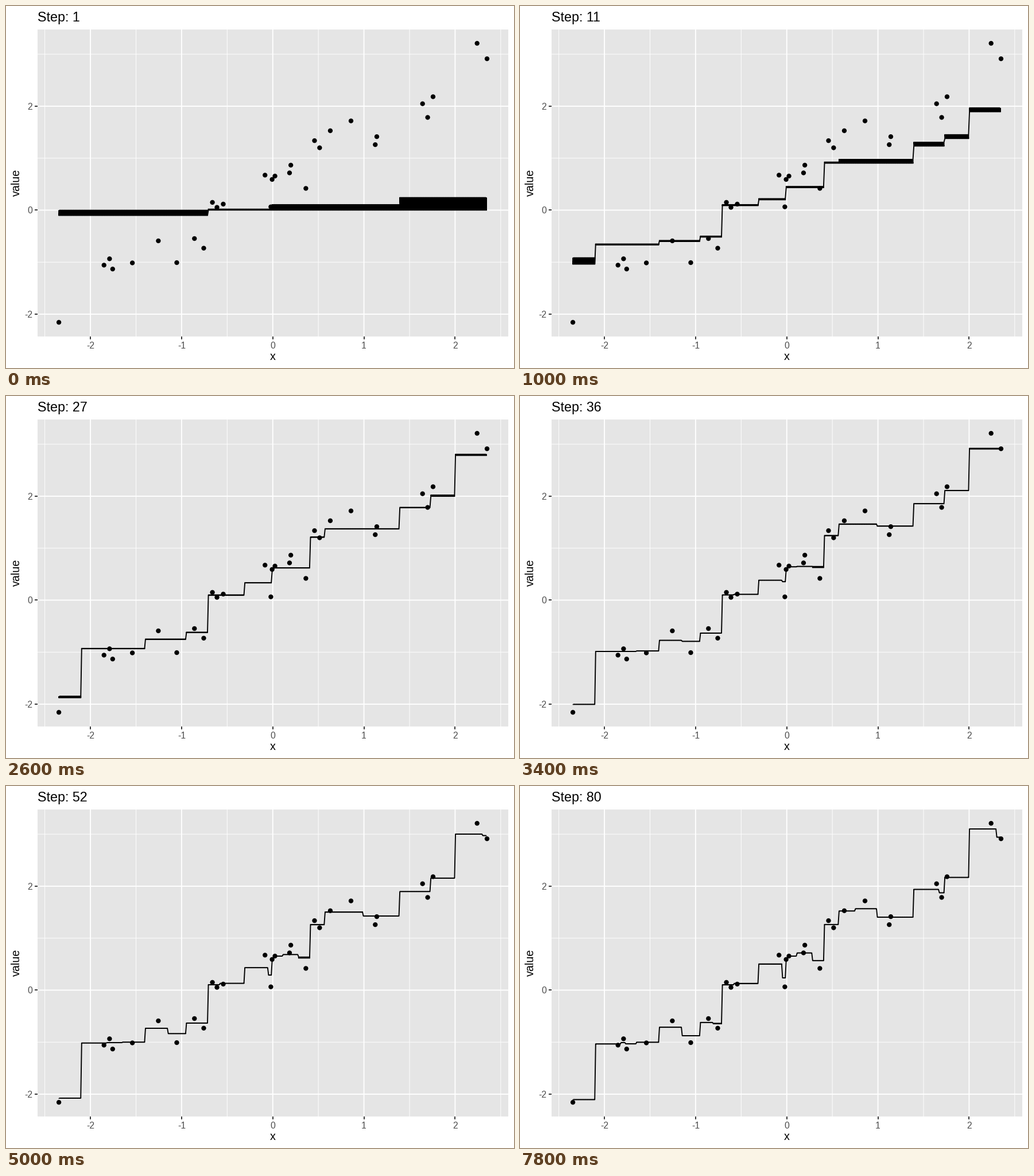
These frames come from a looping animation (885x632 px, 8000 ms). A matplotlib script:

```python
import numpy as np
import matplotlib.pyplot as plt
from matplotlib.animation import FuncAnimation

W, H, DPI = 885, 632, 64
FRAMES, INTERVAL = 40, 200
RATE, DEPTH = 0.1, 2

plt.rcParams["font.family"] = "Liberation Sans"
plt.rcParams["axes.unicode_minus"] = False
plt.rcParams["path.simplify"] = False

# The observations (x, y); every curve is computed from these.
X, Y = np.array([
    (-2.346, -2.157), (-1.851, -1.057), (-1.790, -0.935), (-1.756, -1.132),
    (-1.540, -1.014), (-1.255, -0.590), (-1.053, -1.009), (-0.859, -0.546),
    (-0.757, -0.731), (-0.662, 0.150), (-0.612, 0.054), (-0.543, 0.117),
    (-0.085, 0.674), (-0.021, 0.064), (-0.007, 0.591), (0.024, 0.656),
    (0.184, 0.717), (0.198, 0.866), (0.363, 0.419), (0.458, 1.337),
    (0.514, 1.200), (0.631, 1.528), (0.858, 1.717), (1.124, 1.260),
    (1.141, 1.414), (1.643, 2.047), (1.699, 1.784), (1.758, 2.182),
    (2.241, 3.209), (2.350, 2.912)]).T
GRID = np.arange(X[0], X[-1], 0.01)


def px(size):
    """Pixels to points."""
    return size * 72 / DPI


def padded(values, share=0.05):
    """Data range with a margin on both sides."""
    pad = share * np.ptp(values)
    return values.min() - pad, values.max() + pad


def leaves(res, lo, hi, depth):
    """Split res[lo:hi] greedily; return a list of (lo, hi, mean)."""
    part = res[lo:hi]
    n = hi - lo
    if depth == 0 or n < 2:
        return [(lo, hi, part.mean())]
    left = np.cumsum(part)[:-1]
    count = np.arange(1, n)
    gain = left ** 2 / count + (part.sum() - left) ** 2 / (n - count)
    cut = lo + 1 + int(np.argmax(gain))
    return leaves(res, lo, cut, depth - 1) + leaves(res, cut, hi, depth - 1)


def boost(steps):
    """Fitted curve on GRID after 0..steps rounds of boosting."""
    mids = (X[:-1] + X[1:]) / 2
    cell = np.searchsorted(mids, GRID, side="right")
    fit = np.zeros(len(X))
    curves = [fit[cell]]
    for _ in range(steps):
        res = Y - fit
        for lo, hi, mean in leaves(res, 0, len(X), DEPTH):
            fit[lo:hi] += RATE * mean
        curves.append(fit[cell])
    return curves


def step_at(i):
    return round(1 + 2.036 * i)


CURVES = boost(step_at(FRAMES - 1))

fig = plt.figure(figsize=(W / DPI, H / DPI), dpi=DPI, facecolor="white")
left, right, bottom, top = 54.8, 875.3, 576.6, 40.8
ax = fig.add_axes([left / W, 1 - bottom / H,
                   (right - left) / W, (bottom - top) / H],
                  facecolor="#e5e5e5")
ax.set_xlim(padded(X))
ax.set_ylim(padded(Y))
ax.spines[:].set_visible(False)
ax.set_axisbelow(True)
ax.set_xticks(range(-2, 3))
ax.set_xticks(np.arange(-2.5, 3), minor=True)
ax.set_yticks(range(-2, 3, 2))
ax.set_yticks(range(-1, 4, 2), minor=True)
ax.grid(which="major", color="white", lw=px(1.9), snap=False)
ax.grid(which="minor", color="white", lw=px(0.95), snap=False)
ax.tick_params(which="minor", length=0)
ax.tick_params(which="major", length=px(5), width=px(1.9), color="#333333",
               labelcolor="#4d4d4d", labelsize=px(15.8), pad=px(4))


def label(x, y, text, size, **kw):
    return fig.text(x / W, 1 - y / H, text, fontsize=px(size), **kw)


label(464.7, 618, "x", 19.8, ha="center", va="baseline")
label(28, 308, "value", 19.8, ha="right", va="center", rotation=90)
title = label(55, 26.5, "", 23.3, ha="left", va="baseline")

# One size per dot keeps the dots at fractional pixel positions.
ax.scatter(X, Y, s=np.full(len(X), px(8.3) ** 2), color="black", lw=0,
           zorder=4)
curve, = ax.plot([], [], color="black", lw=px(1.9), zorder=3,
                 solid_capstyle="butt", solid_joinstyle="round")


def draw(i):
    step = step_at(i)
    # Zigzag between the previous and the current fit.
    pair = np.column_stack([CURVES[step - 1], CURVES[step]])
    curve.set_data(np.repeat(GRID, 2), pair.ravel())
    title.set_text(f"Step: {step}")
    return curve, title


anim = FuncAnimation(fig, draw, frames=FRAMES, interval=INTERVAL, repeat=True,
                     repeat_delay=0, blit=False)
plt.show()
```
